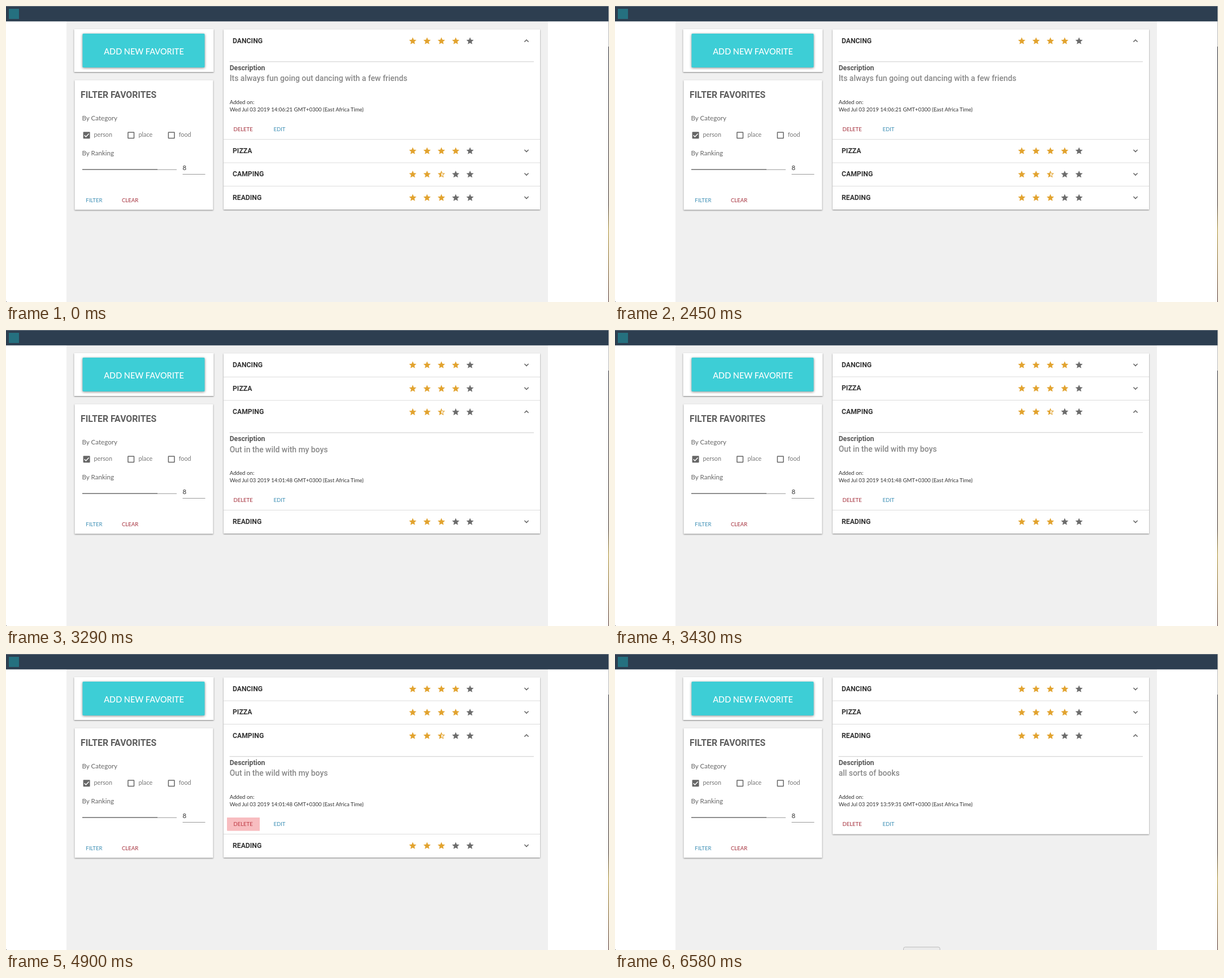
These frames come from a looping animation (1067 px wide and 525 px high, 6650 ms). An HTML page:

```html
<!DOCTYPE html>
<html lang="en">
<head>
<meta charset="utf-8">
<title>Favorites</title>
<style>
  html, body { margin: 0; height: 100%; overflow: hidden; background: #fff; }
  svg { display: block; }
  text { font-family: Lato, sans-serif; font-size: 9.5px; fill: #333; }
  .title, .label, .desc { font-family: Roboto, sans-serif; font-weight: 600; font-size: 12.2px; }
  .label { fill: #555; }
  .desc { font-size: 13.9px; font-weight: 500; fill: #888; }
  .field { font-size: 11.6px; fill: #666; }
  .option { font-size: 10.8px; fill: #777; }
  .red { fill: #a5303c; }
  .blue { fill: #3d8fb5; }
  .card { fill: #fff; filter: drop-shadow(0 1px 1px #0007); }
  .box { fill: none; stroke: #666; stroke-width: 1.5; }
</style>
</head>
<body>
<svg id="stage" width="1067" height="525" viewBox="0 0 1067 525">
  <defs>
    <linearGradient id="edge" x2="0" y2="1">
      <stop offset="0" stop-color="#2a2a33"/>
      <stop offset=".62" stop-color="#3a2a22"/>
      <stop offset=".72" stop-color="#a88a28"/>
      <stop offset=".82" stop-color="#8a6a24"/>
      <stop offset="1" stop-color="#4a2a26"/>
    </linearGradient>
    <path id="star" transform="scale(.65) translate(-12 -11.6)"
      d="M12 17.27L18.18 21l-1.64-7.03L22 9.24l-7.19-.61L12 2 9.19 8.63 2 9.24l5.46 4.73L5.82 21z"/>
    <path id="half" transform="scale(.65) translate(-12 -11.6)"
      d="M22 9.24l-7.19-.62L12 2 9.19 8.63 2 9.24l5.46 4.73L5.82 21 12 17.27 18.18 21l-1.63-7.03zM12 15.4V6.1l1.71 4.04 4.38.38-3.32 2.88 1 4.28z"/>
  </defs>

  <rect x="107" y="27" width="852" height="498" fill="#f0f0f0"/>
  <rect width="1066" height="27.3" fill="#2d3e50"/>
  <rect width="1066" height="1" fill="#6c7782"/>
  <rect x="5" y="5" width="18" height="18" fill="#25707f"/>
  <rect x="1066" width="1" height="72" fill="#b8b8b8"/>
  <rect x="1066" y="72" width="1" height="453" fill="url(#edge)"/>
  <rect y="524" width="1" height="1" fill="#555"/>

  <rect class="card" x="120.5" y="41" width="247" height="76"/>
  <rect x="135.5" y="49" width="216" height="60" rx="1.5" fill="#3dced6"
    style="filter:drop-shadow(0 1.5px 2px #0007)"/>
  <text x="244" y="86.2" text-anchor="middle" style="font-size:14.5px;font-weight:500;fill:#fff">ADD NEW FAVORITE</text>

  <rect class="card" x="121.5" y="131.5" width="245" height="230"/>
  <text class="title" x="132" y="163.2" style="font-size:15.8px;fill:#5e5e5e">FILTER FAVORITES</text>
  <text class="field" x="134.5" y="203.4">By Category</text>
  <rect x="136.6" y="223.2" width="12" height="12" rx="1" fill="#666"/>
  <path d="M138.7 229.3l2.7 2.7 5.2-5.4" fill="none" stroke="#fff" stroke-width="1.5"/>
  <rect class="box" x="215.9" y="223.9" width="10.6" height="10.6" rx=".5"/>
  <rect class="box" x="287.4" y="223.9" width="10.6" height="10.6" rx=".5"/>
  <text class="option" x="155.5" y="232.4">person</text>
  <text class="option" x="234.5" y="232.4">place</text>
  <text class="option" x="305.7" y="232.4">food</text>
  <text class="field" x="134.5" y="265">By Ranking</text>
  <path d="M268 290.2h34" stroke="#999" stroke-width="1"/>
  <path d="M135 290h133" stroke="#6a6a6a" stroke-width="1.6"/>
  <text x="312.5" y="291" style="font-size:11.5px">8</text>
  <path d="M312.5 298.5h40" stroke="#999"/>
  <text class="blue" x="141.3" y="347.8">FILTER</text>
  <text class="red" x="205" y="347.8">CLEAR</text>

  <rect id="card" class="card" x="385" y="41.5" width="560"/>
  <svg id="list" x="385" y="41.5" width="560"></svg>
  <svg id="button" x="391" y="290" width="58" height="23.7">
    <rect id="tint" width="58" height="23.7" fill="#ef4a50"/>
    <circle id="ripple" cx="30" cy="11.5" fill="#e8404a"/>
  </svg>
  <rect id="tab" y="519.8" height="12" rx="3" fill="#ebebeb" stroke="#bdbdbd"/>
</svg>
<script>
const LOOP = 6650, STEP = 70, HEAD = 41.5, BODY = 153.5;
const OPEN = 3080, PRESS = 4490, REMOVED = 5040;
const $ = id => document.getElementById(id);
const set = (el, attrs) => { for (const k in attrs) el.setAttribute(k, attrs[k]); };
const ramp = (t, start, span) => Math.min(1, Math.max(0, (t - start) / span));

// Cubic bezier (a,0) (b,1), solved by bisection
function ease(x, a, b) {
  let lo = 0, hi = 1, s = .5;
  for (let i = 0; i < 24; i++) {
    s = (lo + hi) / 2;
    const at = 3 * (1 - s) * s * ((1 - s) * a + s * b) + s ** 3;
    if (at < x) lo = s; else hi = s;
  }
  return 3 * (1 - s) * s * s + s ** 3;
}

const items = [
  ["DANCING", 4, "Its always fun going out dancing with a few friends", "14:06:21"],
  ["PIZZA", 4, "", ""],
  ["CAMPING", 2.5, "Out in the wild with my boys", "14:01:48"],
  ["READING", 3, "all sorts of books", "13:59:31"]
];

function stars(rank) {
  return [0, 1, 2, 3, 4].map(i =>
    `<use href="#${rank - i === .5 ? "half" : "star"}" x="${334.7 + i * 25.35}" y="20.2"
      fill="${rank > i ? "#e2a32f" : "#6c6c6c"}"/>`).join("");
}

$("list").innerHTML = items.map(([name, rank, desc, time], i) => `<g class="row">
  <rect width="560" height="${HEAD + BODY}" fill="#fff"/>
  ${i ? '<path d="M0 0h560" stroke="#dcdcdc"/>' : ""}
  <text class="title" x="16" y="24.2">${name}</text>${stars(rank)}
  <path class="chevron" d="M-3.6 -1.8L0 1.8L3.6 -1.8" fill="none" stroke="#666" stroke-width="1.5"/>
  <path d="M10.5 57.3h538.5" stroke="#ccc"/>
  <text class="label" x="10.7" y="72">Description</text>
  <text class="desc" x="10.7" y="91.8">${desc}</text>
  <text x="10.7" y="132" style="font-size:9.7px">Added on:</text>
  <text x="10.7" y="145.3">Wed Jul 03 2019 ${time} GMT+0300 (East Africa Time)</text>
  <text class="red" x="17.5" y="180">DELETE</text>
  <text class="blue" x="88.5" y="180">EDIT</text>
</g>`).join("");
const rows = [...document.querySelectorAll(".row")];

function draw(t) {
  const removed = t >= REMOVED;
  const p = ease(ramp(t, OPEN, 225), .4, .2);
  const open = removed ? [0, 0, 0, 1] : [1 - p, 0, p, 0];
  let y = 0;
  rows.forEach((row, i) => {
    const gone = removed && i === 2;
    set(row, { transform: `translate(0 ${y})`, display: gone ? "none" : "inline" });
    const turn = Math.round(open[i] * 2) * -90;
    set(row.querySelector(".chevron"), { transform: `translate(536 20.3) rotate(${turn})` });
    if (!gone) y += HEAD + BODY * open[i];
  });
  set($("card"), { height: y });
  set($("list"), { height: y });

  const hover = ramp(t, 4130, 200) - ramp(t, 5600, 200);
  set($("tint"), { opacity: .13 * hover });
  const grow = ease(ramp(t, PRESS, 450), 0, .2);
  set($("ripple"), { r: 32 * grow, opacity: .25 * (1 - ramp(t, PRESS + 450, 400)) });

  const x = t < 6580 ? 484.5 : 510.5;
  set($("tab"), { x, width: 575 - x, display: t < 6440 ? "none" : "inline" });
}

function tick() {
  const t = performance.now() % LOOP;
  draw(Math.floor(t / STEP) * STEP);
  requestAnimationFrame(tick);
}
tick();
</script>
</body>
</html>
```
